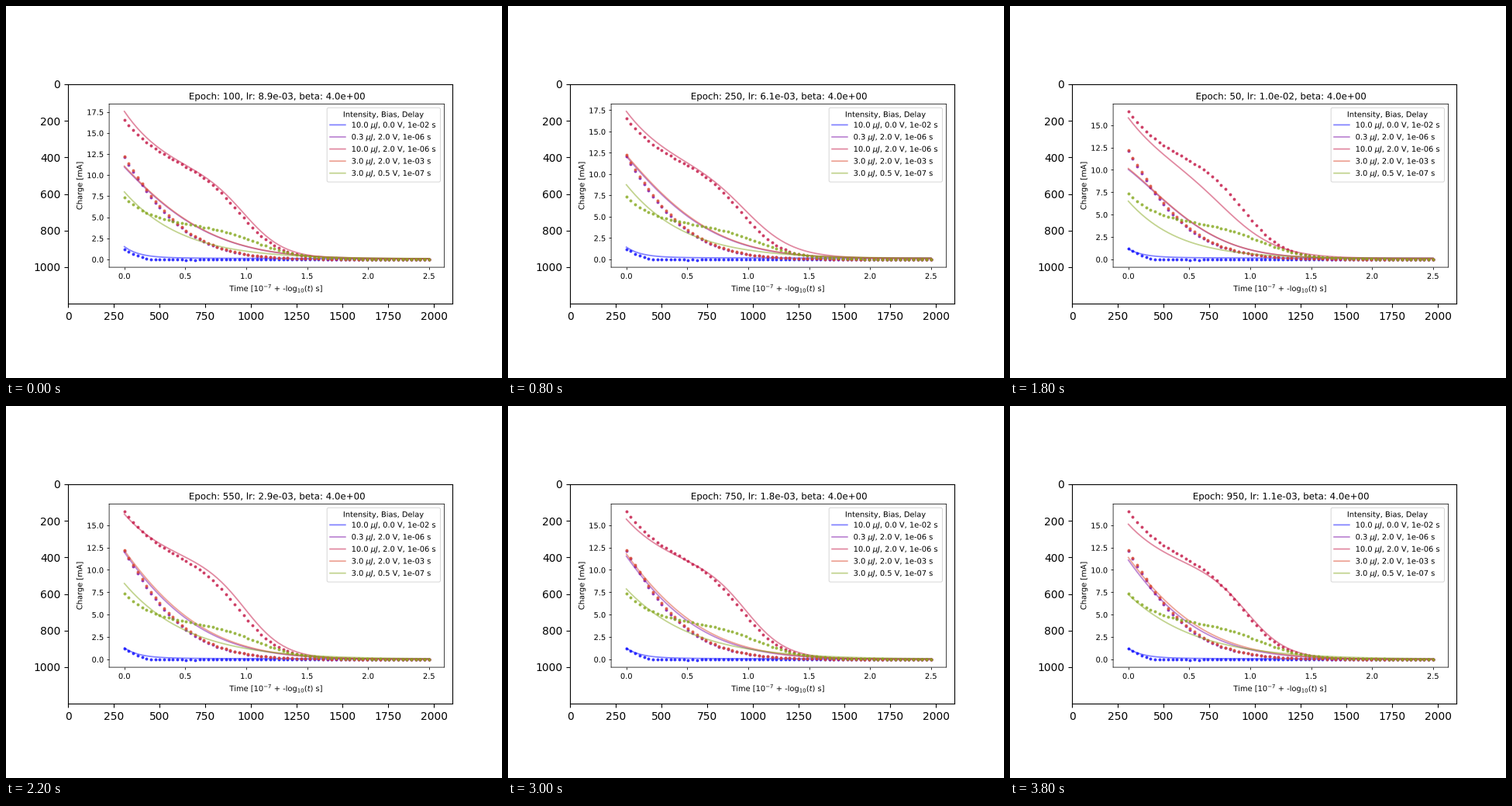
A matplotlib script for the animation above (4000 ms loop, 640 by 480 pixels).

```python
import numpy as np
import matplotlib.pyplot as plt
from matplotlib.animation import FuncAnimation
from matplotlib.patheffects import Normal
from matplotlib.text import Text

W, H = 640, 480
K = 496 / 2100 * 3  # scale of the inner plot relative to 100 dpi

# Snapshots play in alphabetical order of their epoch number.
EPOCHS = sorted(range(50, 1001, 50), key=str)

SETUPS = [("10.0", "0.0", "1e-02", "#0808ff"), ("0.3", "2.0", "1e-06", "#7d10a8"),
          ("10.0", "2.0", "1e-06", "#c41545"), ("3.0", "2.0", "1e-03", "#dc4a30"),
          ("3.0", "0.5", "1e-07", "#86a920")]

t = np.linspace(0, 2.5, 70)


def decay(start, rate, bend=0.):
    return start * np.exp(-rate * t - bend * t ** 2)


def shelf(start, level, fall, edge, width):
    """Quick decay onto a shelf that ends in a soft step."""
    return (level + decay(start - level, 1 / fall)) / (1 + np.exp((t - edge) / width))


def fits(epoch):
    def at(*values):
        return np.interp(epoch, [50, 100, 150, 350, 950], values)

    rise = 1 - np.exp(-8 * t)
    tail = at(.1, .07, .2, .03, .02) * rise
    start = at(10.05, 10.95, 11.75, 12.4, 11.1)
    rate = at(1.15, 1.45, 1.35, 1.55, 1.75)
    bend = at(1.2, .57, .75, .58, .6)
    age = epoch / 1000
    curves = [
        decay(at(1.15, 1.5, 1.55, 1.3, 1.2), 8.3) + .12 * rise * np.exp(-t),
        decay(start, rate, bend),
        shelf(at(16.2, 17.6, 18.1, 16.85, 15.15), at(9.7, 9.6, 9.7, 10.8, 9.7), .37,
              at(.82, 1, .98, 1.01, .985), at(.22, .165, .23, .165, .165)),
        decay(start + .1 + .2 * age, rate - .1 * age, bend),
        decay(at(6.5, 8, 8.4, 9.1, 7.25), at(2.47, 2.12, 2.3, 1.95, 1.82), .07)]
    return [c + tail for c in curves]


dots = np.array([decay(1.3, 5, 35) - decay(.1, 1.5), decay(12.1, 2.05, 1),
                 shelf(16.6, 10.2, .35, .955, .165), decay(12.25, 2, 1),
                 shelf(7.4, 4, .24, 1.08, .19)])
dots += np.random.default_rng(4).normal(0, .01, dots.shape) * (t > .3)

fig, frame = plt.subplots(figsize=(W / 100, H / 100), dpi=100)
frame.set(xlim=(-.5, 2099.5), ylim=(1199.5, -.5), aspect="equal")

style = {"font.size": 10 * K, "axes.linewidth": .75 * K, "axes.labelpad": 4 * K,
         "axes.titlepad": 6 * K, "lines.linewidth": 1.8 * K,
         "lines.markersize": 6 * K, "lines.markeredgewidth": K,
         "patch.linewidth": K}
for s in ("xtick", "ytick"):
    style.update({s + ".major.size": 3.5 * K, s + ".major.width": .8 * K,
                  s + ".major.pad": 3.5 * K})

with plt.rc_context(style):
    left, right, top, bottom = 133.1, 565.4, 126.4, 337.1
    ax = fig.add_axes([left / W, 1 - bottom / H, (right - left) / W, (bottom - top) / H])
    lines = []
    for y, (power, bias, delay, color) in zip(dots, SETUPS):
        label = f"{power} $\\mu J$, {bias} V, {delay} s"
        lines += ax.plot(t, y, color=color, alpha=.5, label=label)
        ax.plot(t, y, ".", color=color, alpha=.75)
    ax.set_xticks(np.arange(0, 2.6, .5))
    ax.set_yticks(np.arange(0, 17.6, 2.5))
    ax.set_xlim(-.125, 2.625)
    ax.set_xlabel("Time [$10^{-7}$ + -log$_{10}(t)$ s]", labelpad=2.2 * K)
    ax.set_ylabel("Charge [mA]")
    ax.set_title("Epoch")
    ax.legend(title="Intensity, Bias, Delay", loc="upper right", labelspacing=.16)
    # Unsnapped outlines keep the look of a downscaled plot.
    for artist in ax.findobj():
        artist.set_snap(False)
    for text in ax.findobj(Text):
        text.set_path_effects([Normal()])


def update(i):
    epoch = EPOCHS[i]
    ys = fits(epoch)
    for line, y in zip(lines, ys):
        line.set_ydata(y)
    lo, hi = dots.min(), max(dots.max(), np.max(ys))
    pad = .05 * (hi - lo)
    ax.set_ylim(lo - pad, hi + pad)
    lr = .01 * .885 ** (epoch / 50 - 1)
    ax.title.set_text(f"Epoch: {epoch}, lr: {lr:.1e}, beta: {4:.1e}")
    return lines


anim = FuncAnimation(fig, update, frames=len(EPOCHS), interval=200,
                     repeat=True, repeat_delay=0)
plt.show()
```
